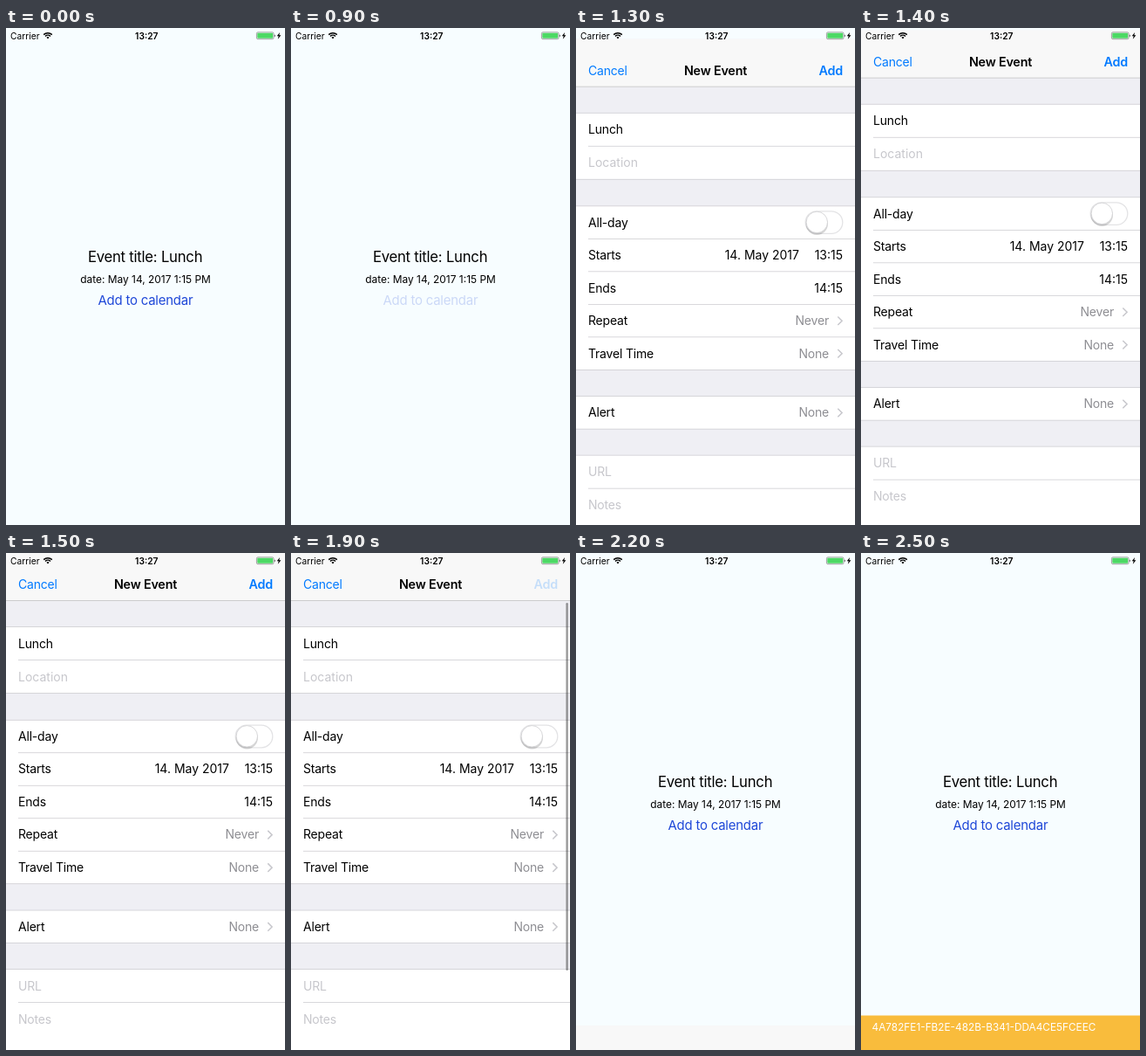
These frames come from a looping animation (320x569 px, 3000 ms). An HTML page:

```html
<!DOCTYPE html>
<html lang="en">
<head>
<meta charset="utf-8">
<title>Add to calendar</title>
<style>
  html, body { margin: 0; width: 100%; height: 100%; overflow: hidden; background: #f7fdff; }
  svg { display: block; width: 100%; height: 100%; }
  text { font: 14px Inter, "Liberation Sans", sans-serif; letter-spacing: -.014em; white-space: pre; }
  .mid { text-anchor: middle; }
  .end { text-anchor: end; }
  .title { font-size: 16.7px; }
  .link { font-size: 14.95px; fill: #1f48d8; }
  .date { font-size: 11.95px; letter-spacing: 0; }
  .code { font-size: 11.8px; letter-spacing: 0; }
  .status { font-size: 10.25px; letter-spacing: 0; }
  .bold { font-weight: 600; }
  .head { font-size: 14.35px; }
  .blue { fill: #007aff; }
  .gray { fill: #8e8e93; }
  .hint { fill: #c7c7cc; }
  .num { letter-spacing: 0; }
</style>
</head>
<body>
<svg viewBox="0 0 320 569">
  <rect width="320" height="569" fill="#f7fdff"/>
  <text class="title mid" x="159.6" y="268">Event title: Lunch</text>
  <text class="date mid" x="160" y="291.7">date: May 14, 2017 1:15 PM</text>
  <text class="link mid" id="link" x="159.9" y="316.6">Add to calendar</text>

  <g id="toast">
    <rect y="529.5" width="320" height="40" fill="#f9bc3c"/>
    <text class="code" x="12.6" y="547.3" fill="#fff">4A782FE1-FB2E-482B-B341-DDA4CE5FCEEC</text>
  </g>

  <g id="sheet">
    <rect width="320" height="569" fill="#efeff4"/>
    <rect width="320" height="54.5" fill="#f8f8f8"/>
    <rect y="54.2" width="320" height=".6" fill="#b2b2b2"/>
    <text class="blue" x="14" y="41">Cancel</text>
    <text class="head bold mid" x="160" y="41">New Event</text>
    <text class="head blue bold end" id="add" x="306" y="41">Add</text>
    <g id="form"></g>
    <rect x="263.2" y="197.2" width="42.6" height="25.6" rx="12.8" fill="#fff" stroke="#e3e3e5" stroke-width="1.3"/>
    <circle cx="276.3" cy="211.8" r="12.6" fill="#000" opacity=".16"/>
    <circle cx="276.3" cy="209.8" r="12.2" fill="#fff" stroke="#c8c8ca" stroke-width=".7"/>
    <rect id="bar" x="315.4" y="57" width="2.4" height="421" rx="1.2" fill="#000"/>
  </g>

  <text class="status" x="5" y="12.8">Carrier</text>
  <g fill="none" stroke="#000" stroke-width="1.5">
    <path d="M43.2 7.6a6.9 6.9 0 0 1 9.6 0M45 9.5a4.3 4.3 0 0 1 6 0"/>
    <path d="M48 12.4l-1.5-1.6a2.2 2.2 0 0 1 3 0z" fill="#000" stroke="none"/>
  </g>
  <text class="status bold mid" x="161.3" y="12.9">13:27</text>
  <rect x="287.4" y="4.9" width="19.6" height="7.8" rx="1.5" fill="none" stroke="#777" stroke-width=".7"/>
  <rect x="288.3" y="5.8" width="17.8" height="6" rx=".7" fill="#4cd964"/>
  <path d="M307.7 7.4q1.4 .2 1.4 1.4t-1.4 1.4z" fill="#777"/>
  <path d="M314.1 5l-3.4 4.2h2l-.9 3.6 3.6-4.5h-2.1z"/>
</svg>
<script>
const $ = id => document.getElementById(id);
const LOOP = 3000, STEP = 100, H = 569;

const label = (x, y, s, cls = '') => `<text class="${cls}" x="${x}" y="${y}">${s}</text>`;
const line = (x, y) => `<rect x="${x}" y="${y - .3}" width="${320 - x}" height=".7" fill="#c8c7cc"/>`;
const link = (y, s) => label(290, y, s, 'gray end') +
  `<path d="M300.3 ${y - 9.6}l4.8 4.8-4.8 4.8" fill="none" stroke="#c7c7cc" stroke-width="1.5"/>`;

// White group of rows, each [name, class, extra content]
function group(top, rowH, rows, bottom = top + rowH * rows.length) {
  let out = `<rect y="${top}" width="320" height="${bottom - top}" fill="#fff"/>` + line(0, top) + line(0, bottom);
  rows.forEach(([name, cls, extra], i) => {
    const base = top + rowH * (i + .5) + 5;
    if (i) out += line(14, top + rowH * i);
    out += label(14, base, name, cls) + (extra ? extra(base) : '');
  });
  return out;
}

const time = s => y => label(306, y, s, 'num end');
$('form').innerHTML =
  group(84.6, 38, [['Lunch'], ['Location', 'hint num']]) +
  group(191.2, 37.5, [
    ['All-day'],
    ['Starts', '', y => label(256, y, '14. May 2017', 'num end') + time('13:15')(y)],
    ['Ends', '', time('14:15')],
    ['Repeat', '', y => link(y, 'Never')],
    ['Travel Time', '', y => link(y, 'None')]
  ]) +
  group(409, 37.5, [['Alert', '', y => link(y, 'None')]]) +
  group(476.5, 38, [['URL', 'hint'], ['Notes', 'hint']], 600);

// Share of the way left for a critically damped spring
function left(ms) {
  const k = Math.max(0, ms) * .01826;
  return (1 + k) * Math.exp(-k);
}

const ramp = (t, from, to) => Math.min(1, Math.max(0, (t - from) / (to - from)));

function sheetY(t) {
  if (t < 1500) return H * left(t - 987);
  if (t < 2000) return 0;
  return H * (1 - left(Math.min(t, 2200) - 1939));
}

function draw(t) {
  $('link').setAttribute('opacity', t < 900 || t >= 1100 ? 1 : t < 1000 ? .2 : .6);
  $('sheet').setAttribute('transform', `translate(0 ${sheetY(t).toFixed(2)})`);
  $('sheet').setAttribute('visibility', t >= 1000 && t < 2500 ? 'visible' : 'hidden');
  $('bar').setAttribute('opacity', .4 * ramp(t, 1500, 1700));
  $('add').setAttribute('opacity', 1 - .8 * ramp(t, 1700, 1900));
  $('toast').setAttribute('visibility', t >= 2500 ? 'visible' : 'hidden');
}

const start = performance.now();
function tick(now) {
  const t = Math.max(0, now - start) % LOOP;
  draw(Math.floor(t / STEP) * STEP);
  requestAnimationFrame(tick);
}
draw(0);
requestAnimationFrame(tick);
</script>
</body>
</html>
```
